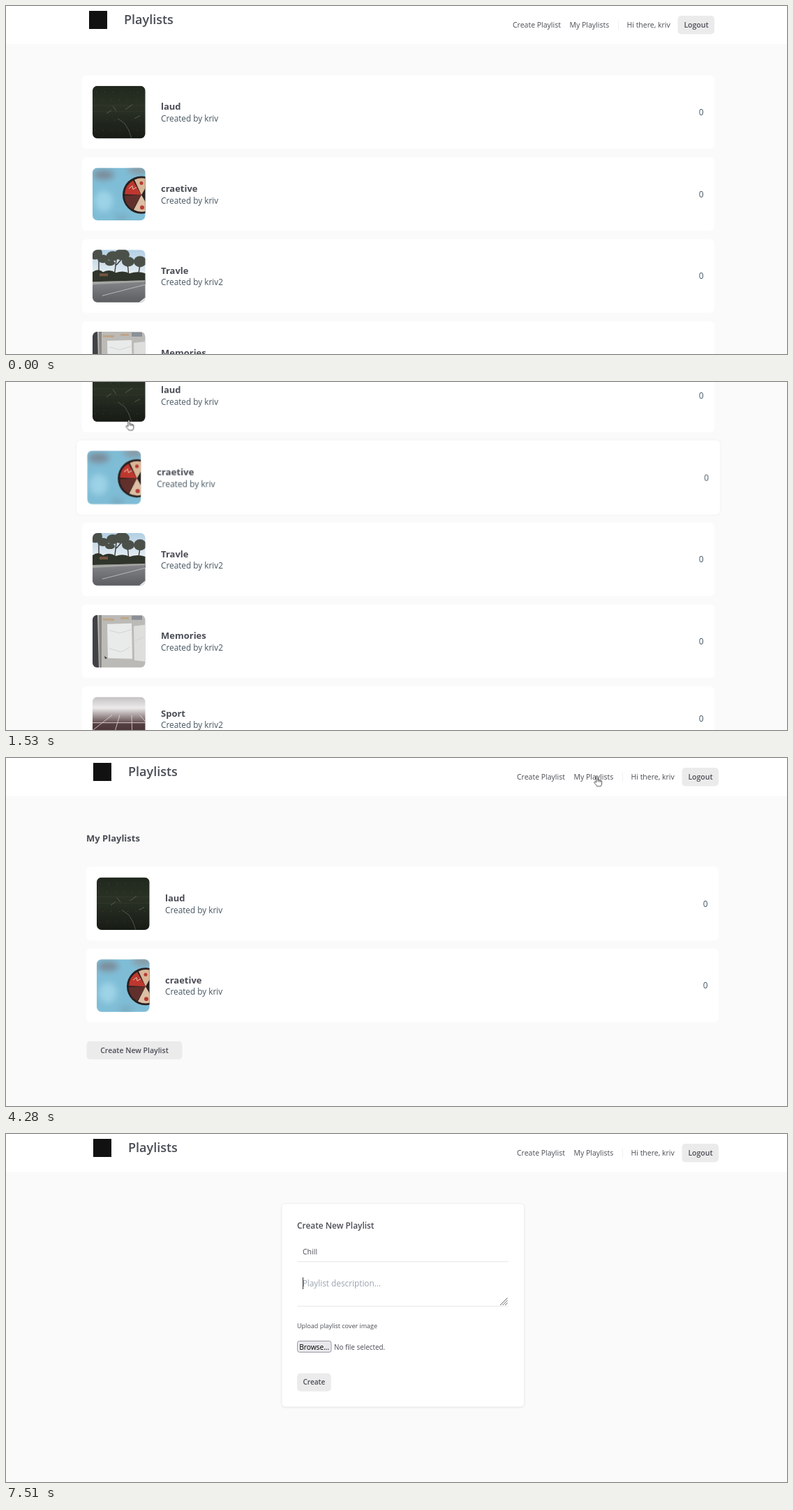
Recreate the animation shown at these times as an HTML page. Size 1119x500 px, loop 8 s.

```html
<!DOCTYPE html>
<html lang="en">
<head>
<meta charset="utf-8">
<title>Playlists</title>
<style>
html, body { margin: 0; width: 100%; height: 100%; overflow: hidden; background: #fafafa; }
#stage { position: absolute; left: 0; top: 0; width: 1119px; height: 500px; overflow: hidden; }
svg { display: block; }
svg, .typed { font: 10.5px Nunito, "Open Sans", sans-serif; fill: #4a4d55; color: #4a4d55; }
.b { font-weight: 600; }
.brand { font-size: 18px; }
.name { font-size: 13px; font-weight: 700; }
.sub { font-size: 11.8px; fill: #455560; }
.small { font-size: 9px; }
.hint { fill: #9ca3af; }
.button { fill: #ebebeb; }
.form { filter: drop-shadow(0 1px 1px #00000012); }

/* one loop is 8 s, so 1% is 80 ms */
.pageA, .pageB, .pageC, .late, .hint1, .caret, .cursor > *, .typed { animation: 8s step-end infinite; }
.pageA { animation-name: pageA; }
.pageB { animation-name: pageB; }
.pageC { animation-name: pageC; }
.late { animation-name: late; }
@keyframes pageA { 0% { visibility: visible } 43.375%, 100% { visibility: hidden } }
@keyframes pageB { 0%, 61.375%, 100% { visibility: hidden } 43.375% { visibility: visible } }
@keyframes pageC { 0% { visibility: hidden } 61.375%, 100% { visibility: visible } }
@keyframes late { 0%, 61.375%, 100% { visibility: hidden } 45.25% { visibility: visible } }

.scroll { animation: scroll 8s ease-in-out infinite; }
@keyframes scroll {
  0%, 12% { transform: none }
  16.2%, 18% { transform: translateY(-154.5px) }
  22.4%, 100% { transform: none }
}

.card { --lift: drop-shadow(0 1px 1.5px #00000014); animation: 8s ease-out infinite; }
.laud { animation-name: laud; }
.craetive { animation-name: craetive; }
.Travle { animation-name: travle; }
.Memories { animation-name: memories; }
@keyframes laud {
  0%, 6.9% { transform: none; filter: none }
  8.9%, 14.4% { transform: scale(1.02); filter: var(--lift) }
  16.2%, 19.3% { transform: none; filter: none }
  20.3% { transform: scale(1.012); filter: var(--lift) }
  22%, 100% { transform: none; filter: none }
}
@keyframes craetive {
  0%, 5.2% { transform: none; filter: none }
  6.4% { transform: scale(1.015); filter: var(--lift) }
  8%, 15% { transform: none; filter: none }
  16.8%, 19% { transform: scale(1.02); filter: var(--lift) }
  20.8%, 100% { transform: none; filter: none }
}
@keyframes travle {
  0%, 4.4% { transform: none }
  5.4% { transform: scale(1.012) }
  6.9%, 100% { transform: none }
}
@keyframes memories {
  0%, 3.75% { transform: none }
  4.5% { transform: scale(1.01) }
  6%, 100% { transform: none }
}

.cursor { animation: travel 8s linear infinite; }
@keyframes travel {
  0%, 3.875% { transform: translate(200px, 488px) }
  5.5% { transform: translate(186px, 330px) }
  7% { transform: translate(176px, 220px) }
  8.25% { transform: translate(172px, 176px) }
  9.6%, 12.5% { transform: translate(171px, 166px) }
  16%, 18% { transform: translate(169px, 67px) }
  22.4% { transform: translate(178px, 18px) }
  25.1%, 28% { transform: translate(183px, 28px); animation-timing-function: ease-in }
  33% { transform: translate(500px, 56px); animation-timing-function: ease-out }
  38.25%, 39% { transform: translate(843px, 30px) }
  40%, 53% { transform: translate(844px, 25px); animation-timing-function: ease-in }
  56% { transform: translate(803px, 36px); animation-timing-function: ease-out }
  58.75%, 66.5% { transform: translate(754px, 27.5px); animation-timing-function: ease-in }
  70% { transform: translate(590px, 190px); animation-timing-function: ease-out }
  72.125%, 100% { transform: translate(487px, 160px) }
}
.cursor .hand { animation-name: hand; }
.cursor .arrow { animation-name: arrow; }
.cursor .beam { animation-name: beam; }
.cursor .click { animation-name: click; }
@keyframes hand {
  0%, 29%, 67.5%, 100% { visibility: hidden }
  3.875%, 37.6% { visibility: visible }
}
@keyframes arrow {
  0%, 37.6%, 70%, 100% { visibility: hidden }
  29%, 67.5% { visibility: visible }
}
@keyframes beam { 0%, 74.625%, 100% { visibility: hidden } 70% { visibility: visible } }
@keyframes click {
  0%, 43.375%, 62.25%, 100% { visibility: hidden }
  42.5%, 60.5% { visibility: visible }
}

.hint1 { animation-name: hint1; }
@keyframes hint1 { 0%, 74.625%, 100% { visibility: hidden } 61.375% { visibility: visible } }
.caret { animation-name: caret; }
@keyframes caret { 0% { visibility: hidden } 93.875%, 100% { visibility: visible } }
.typed {
  position: absolute; left: 425px; top: 162px; height: 14px; line-height: 14px;
  overflow: hidden; white-space: nowrap; border-right: 1px solid; animation-name: typing;
}
@keyframes typing {
  0% { width: 0; border-color: transparent }
  74.625% { width: 7px; border-color: #333 }
  77.125% { width: 7px; border-color: transparent }
  79.625% { width: 7px; border-color: #333 }
  80.5% { width: 13px; border-color: #333 }
  83% { width: 16px; border-color: #333 }
  83.875% { width: 18px; border-color: #333 }
  87.125% { width: 21px; border-color: #333 }
  90.625%, 100% { width: 21px; border-color: transparent }
}
</style>
</head>
<body>
<div id="stage">
<svg width="1119" height="500" viewBox="0 0 1119 500">
  <defs>
    <clipPath id="round"><rect width="75.5" height="75.5" rx="7"/></clipPath>
    <clipPath id="roundLow"><rect width="75.5" height="63" rx="7"/></clipPath>
    <filter id="blur"><feGaussianBlur stdDeviation="4"/></filter>
    <linearGradient id="dark" x2="0" y2="1">
      <stop stop-color="#20271d"/><stop offset=".4" stop-color="#2a3225"/><stop offset="1" stop-color="#171b15"/>
    </linearGradient>
    <linearGradient id="sky" x2="0" y2="1"><stop stop-color="#b3cfe4"/><stop offset=".5" stop-color="#e9eff3"/></linearGradient>
    <linearGradient id="road" x2="0" y2="1"><stop stop-color="#85878a"/><stop offset="1" stop-color="#5b5d61"/></linearGradient>
    <linearGradient id="mist" x2="0" y2="1">
      <stop stop-color="#c4c3c3"/><stop offset=".25" stop-color="#eceaea"/>
      <stop offset=".48" stop-color="#8e7f80"/><stop offset=".62" stop-color="#553e41"/><stop offset="1" stop-color="#3c282c"/>
    </linearGradient>

    <g id="scratches" fill="none" stroke="#a39d86" stroke-width=".5">
      <path d="M0 0H76V76H0Z" fill="url(#dark)" stroke="none"/>
      <path d="M0 28H76M0 37H76" opacity=".15"/>
      <path d="M5 9H74M2 21H70M8 49H72M3 64H70" stroke-dasharray="1 11" opacity=".5"/>
      <path d="M29 29l5 7M20 40l7-5M47 34l10-7M36 47l10 7 6 10 4 12M60 47l8-4" opacity=".8"/>
    </g>

    <g id="plate">
      <path d="M0 0H76V76H0Z" fill="#7fbdd6"/>
      <g filter="url(#blur)">
        <ellipse cx="16" cy="10" rx="15" ry="7" fill="#7b8b99"/>
        <ellipse cx="66" cy="3" rx="15" ry="6" fill="#8898a2"/>
        <ellipse cx="16" cy="48" rx="13" ry="15" fill="#9dd3e7"/>
        <ellipse cx="42" cy="72" rx="10" ry="5" fill="#78aabf"/>
      </g>
      <circle cx="70" cy="39" r="27" fill="#29201f"/>
      <path d="M70 39L82 18A24 24 0 0 0 60 17.2Z" fill="#d8b697"/>
      <path d="M70 39L58 18.2A24 24 0 0 0 46 38Z" fill="#bd372f"/>
      <path d="M70 39L46 40A24 24 0 0 0 58 60Z" fill="#62302c"/>
      <path d="M70 39L59 60.4A24 24 0 0 0 82 60Z" fill="#dcbfa5"/>
      <g fill="#b53b32"><circle cx="70" cy="22" r="2.5"/><circle cx="71" cy="57" r="3"/></g>
      <path d="M52 30l5-4 1 5 5-3" fill="none" stroke="#e6c5ab"/>
    </g>

    <g id="street">
      <path d="M0 0H76V76H0Z" fill="url(#sky)"/>
      <path d="M9 40V14M31 40L34 14M52 40L50 16M65 40L69 16M34 22l8-9M50 24l-7-9" stroke="#39362f" stroke-width="1.4" fill="none"/>
      <g fill="#4b5049">
        <ellipse cx="4" cy="5" rx="10" ry="9"/><ellipse cx="15" cy="13" rx="8" ry="6"/><ellipse cx="29" cy="9" rx="9" ry="7"/>
        <ellipse cx="42" cy="7" rx="11" ry="8"/><ellipse cx="51" cy="17" rx="9" ry="7"/><ellipse cx="68" cy="17" rx="9" ry="8"/>
        <ellipse cx="25" cy="19" rx="7" ry="4"/>
      </g>
      <path d="M0 32q8-6 15 0 10-5 18 1 12-4 20 1 12-4 23 0V50H0Z" fill="#30352b"/>
      <path d="M10 34h12v4H10z" fill="#73553f"/>
      <path d="M0 46L76 44V76H0Z" fill="url(#road)"/>
      <path d="M0 46L76 44V46L0 50Z" fill="#a5a5a2"/>
      <path d="M14 66L76 50" stroke="#c9cacb" stroke-width=".8"/>
      <path d="M66 76L76 68V76Z" fill="#e3e4e4"/>
    </g>

    <g id="wall">
      <path d="M0 0H76V76H0Z" fill="#bbbab7"/>
      <path d="M0 0H7L9 76H0Z" fill="#414246"/>
      <path d="M9 0h4v76h-3z" fill="#8b8782"/>
      <path d="M15 5h16v3H15zM40 3h12v3H40z" fill="#bfa587"/>
      <path d="M56 1h15v6H56z" fill="#8b9097"/>
      <path d="M21 13L56 12 57 63 22 62Z" fill="#e9eaea"/>
      <path d="M59 16L76 14V67L60 65Z" fill="#dededd"/>
      <path d="M24 22l15 4 16-5M24 48l17 5 13-7M61 37l15-6" stroke="#d2d3d3" fill="none"/>
      <path d="M17 59l4 3-3 1z" fill="#333"/>
    </g>

    <g id="track">
      <path d="M0 0H76V63H0Z" fill="url(#mist)"/>
      <path d="M28 26L0 48M39 26L28 63M56 26L57 63M68 26L76 36M0 37H76" stroke="#e4dede" stroke-width="1" opacity=".8"/>
      <text transform="translate(13 60) skewX(-22) scale(1.8 1)" font-size="16" class="b" style="fill:#eee">3</text>
    </g>
  </defs>

  <g id="content"></g>

  <g class="cursor">
    <circle class="click" cx="4" cy="1.5" r="9.5" fill="#f3ee16" opacity=".82"/>
    <path class="hand" d="M3.5 9V1.8Q3.5.5 4.6.5T5.8 1.8V5.6Q7.2 5 7.8 6.2 9 5.6 9.7 6.8 11.5 6.4 11.5 8.2V11Q11.5 13.2 10 15H4.7Q3.4 12.8 .8 10.2.2 8.9 1.2 8.5 2.2 8.2 3.5 9.6ZM5.8 5.6V8.5M7.8 6.2V8.8M9.7 6.8V9" fill="#fff" stroke="#222" stroke-width=".8"/>
    <path class="arrow" d="M.5.5V13L3.4 10.3 5.3 14.7 7.2 13.9 5.3 9.6H9.3Z" fill="#fff" stroke="#222" stroke-width=".8"/>
    <path class="beam" d="M.3.5H2L2.5 1 3 .5H4.7M2.5 1V15M.3 15.5H2L2.5 15 3 15.5H4.7" fill="none" stroke="#222" stroke-width=".9"/>
  </g>
</svg>
<div class="typed">Chill</div>
</div>
<script>
const text = (x, y, words, cls = '', more = '') => `<text x="${x}" y="${y}" class="${cls}" ${more}>${words}</text>`;
const box = (x, y, w, h, r, more) => `<rect x="${x}" y="${y}" width="${w}" height="${h}" rx="${r}" ${more}/>`;
const middle = 'text-anchor="middle"';

const header = x => `
  <rect width="1119" height="54.4" fill="#fff"/>
  ${box(x + 10, 7, 26, 26, 0, 'fill="#111"')}
  ${text(x + 60, 25.5, 'Playlists', 'b brand')}
  ${text(x + 617, 31, 'Create Playlist')}
  ${text(x + 698.5, 31, 'My Playlists')}
  ${box(x + 768, 21, 1, 13, 0, 'fill="#f0f0f0"')}
  ${text(x + 780.5, 31, 'Hi there, kriv')}
  ${box(x + 853.5, 14, 52.5, 26.5, 5, 'class="button"')}
  ${text(x + 880, 31, 'Logout', 'b', middle)}`;

// moving cards respond to the pointer
const card = (x, y, [name, owner, art, h = 75.5], moving) => {
  const mid = y + 15 + h / 2;
  return `<g class="${moving ? `card ${name}` : ''}" style="transform-origin:${x + 453}px ${mid}px">
    ${box(x, y, 906, h + 30, 6, 'fill="#fff"')}
    <g transform="translate(${x + 15} ${y + 15})"><g clip-path="url(#${h < 70 ? 'roundLow' : 'round'})"><use href="#${art}"/></g></g>
    ${text(x + 113, mid - 3.2, name, 'name')}
    ${text(x + 113, mid + 13.4, `Created by ${owner}`, 'sub')}
    ${text(x + 887, mid + 4.4, '0', 'sub', middle)}
  </g>`;
};

const lists = [
  ['laud', 'kriv', 'scratches'],
  ['craetive', 'kriv', 'plate'],
  ['Travle', 'kriv2', 'street'],
  ['Memories', 'kriv2', 'wall'],
  ['Sport', 'kriv2', 'track', 63],
];

const listPage = `<g class="pageA"><g class="scroll">
  ${header(109)}
  ${lists.map((list, i) => card(109, 99.7 + i * 117.75, list, true)).join('')}
</g></g>`;

const minePage = `<g class="pageB">
  ${header(115)}
  ${text(115, 120, 'My Playlists', 'name')}
  <g class="late">
    ${lists.slice(0, 2).map((list, i) => card(115, 156.5 + i * 117.75, list)).join('')}
    ${box(115.5, 407, 137, 26, 5, 'class="button"')}
    ${text(184, 424, 'Create New Playlist', 'b', middle)}
  </g>
</g>`;

const formPage = `<g class="pageC">
  ${header(115)}
  ${box(395, 100, 347.5, 292, 5, 'class="form" fill="#fff" stroke="#ececec" stroke-width=".8"')}
  ${text(417, 135.5, 'Create New Playlist', 'b', 'style="font-size:11.9px"')}
  <g class="hint1">${text(424.7, 172.5, 'Playlist title', 'hint', 'style="font-size:10.3px"')}</g>
  <path d="M417 183.5H720M417 247.3H720" stroke="#e5e7eb"/>
  ${text(424.7, 219, 'Playlist description...', 'hint', 'style="font-size:11.8px"')}
  <path d="M708 246L718.5 235.5M711.5 246L718.5 239M715 246L718.5 242.5" stroke="#555" stroke-width=".9"/>
  ${text(417, 279.3, 'Upload playlist cover image', 'small')}
  ${box(417.5, 297.5, 48.5, 16, 3, 'fill="#e9e9ed" stroke="#8f8f9d" stroke-width=".9"')}
  ${text(441.7, 309.5, 'Browse...', '', middle + ' style="fill:#000;font-size:10.2px"')}
  ${text(470, 309.5, 'No file selected.', '', 'style="font-size:9.9px"')}
  ${box(417, 343.7, 48.7, 26, 5, 'class="button"')}
  ${text(441.4, 360.3, 'Create', 'b', middle + ' style="font-size:10.1px"')}
  <path class="caret" d="M425.5 206V223" stroke="#333"/>
</g>`;

document.getElementById('content').innerHTML = listPage + minePage + formPage;
</script>
</body>
</html>
```
